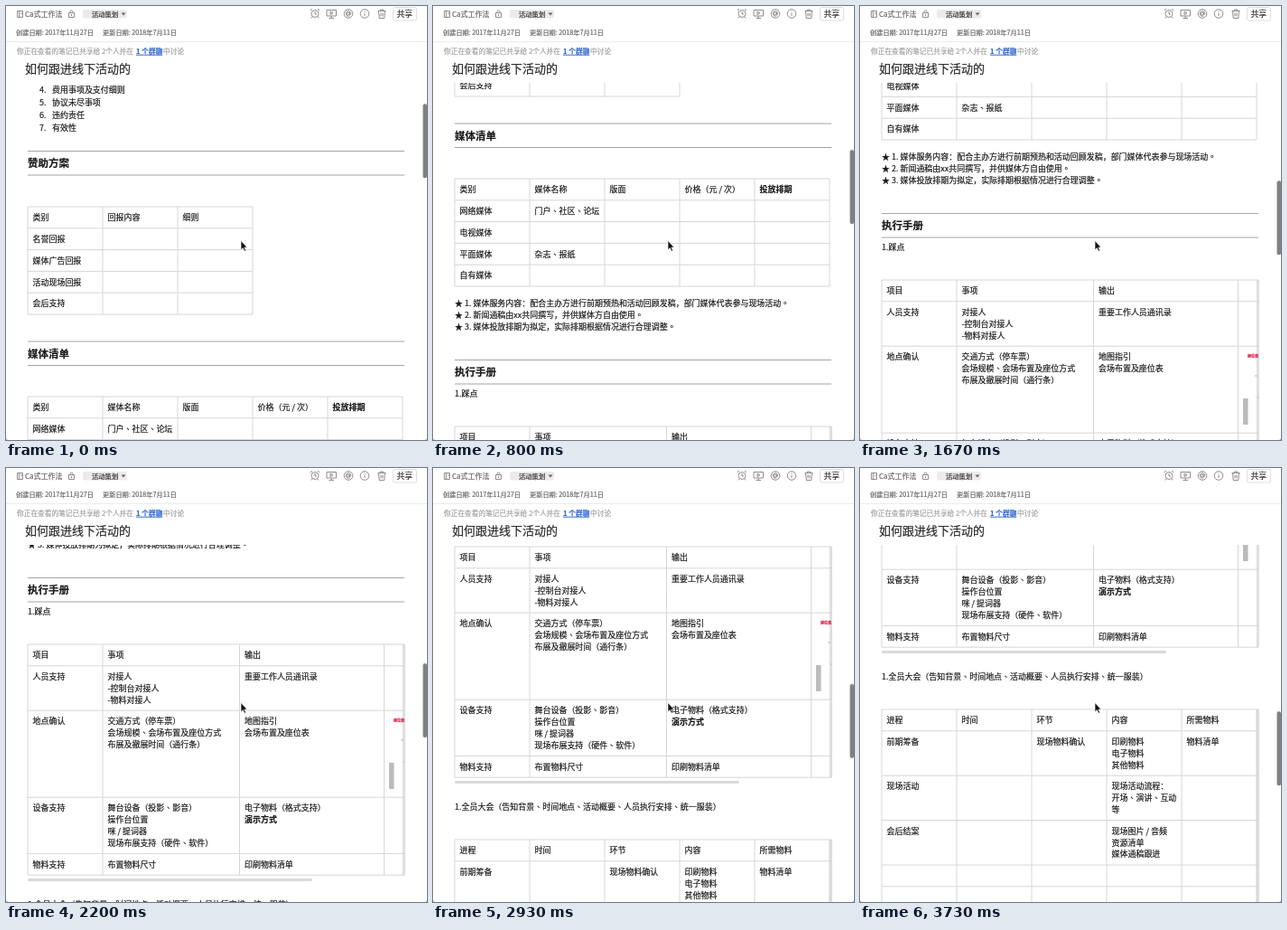
An HTML page for the animation above (3.99 s loop, 466 px wide and 480 px high).

```html
<!DOCTYPE html>
<html lang="zh-CN">
<head>
<meta charset="utf-8">
<title>活动策划</title>
<style>
html, body { margin: 0; width: 100%; height: 100%; overflow: hidden; background: #fff; }
svg { display: block; font-family: "Noto Sans CJK SC", "Noto Sans CJK", sans-serif; white-space: pre; }
.mid { font-family: "Noto Sans CJK TC", "Noto Sans CJK SC", sans-serif; }
.icons { fill: none; stroke: #808080; stroke-width: .9; }
.grid { fill: none; stroke: #d6d6d6; }
.rule { fill: none; stroke: #a4a4a4; }
</style>
</head>
<body>
<svg width="466" height="480" viewBox="0 0 466 480">
  <defs>
    <clipPath id="view"><rect y="85" width="466" height="395"/></clipPath>
    <linearGradient id="edge">
      <stop offset="0" stop-color="#d4d4d4" stop-opacity="0"/>
      <stop offset="1" stop-color="#c8c8c8"/>
    </linearGradient>
  </defs>
  <g clip-path="url(#view)"><g id="page"></g></g>
  <g id="head">
    <path d="M0 39.5H466" stroke="#ececec"/>
    <g class="icons">
      <path d="M12.5 5.5h6v7h-6zM14.5 5.5v7M16 8h2"/>
      <path d="M69.5 7.5h6v5h-6zM71 7.5v-1a1.5 1.5 0 0 1 3 0v1M72.5 9v2"/>
      <circle cx="342" cy="8.5" r="4"/>
      <path d="M342 6v3h2M337 5l2-2M347 5l-2-2M339 12l-1 1.5M345 12l1 1.5"/>
      <path d="M355 4.5h10.5v6.5h-10.5zM360.2 11v2M357.5 13.5h5.5M359 6v3.5l3-1.7z"/>
      <circle cx="379" cy="8.5" r="4.8"/>
      <circle cx="378.8" cy="8.5" r="1.5"/>
      <path d="M380.3 7v2.2q1.2 1 1.5-.7a2.8 2.8 0 1 0-1.3 2.3"/>
      <circle cx="397" cy="8.5" r="4.8"/>
      <path d="M397 7.7v3.3M397 5.6v1"/>
      <path d="M411.5 5.5h9M414.5 5.5v-1.5h3v1.5M412.5 5.5l.7 8h5.6l.7-8M415 7.5v4M417 7.5v4"/>
    </g>
    <rect x="85" y="4" width="49" height="9.5" rx="2" fill="#ebebeb"/>
    <path d="M127.5 7.5h5l-2.5 3z" fill="#666"/>
    <rect x="428.5" y="1.5" width="26" height="14.5" rx="2" fill="#fff" stroke="#dedede"/>
  </g>
  <rect id="thumb" x="461.5" y="108.3" width="4.5" height="82" rx="2" fill="#808080"/>
  <path d="M260 259.5v10.2l2.3-2 1.6 3.6 1.7-.7-1.6-3.6h3z" fill="#111" stroke="#fff" stroke-width=".7"/>
  <path d="M0 477q0 3 3 3h-3zM466 477q0 3-3 3h3z" fill="#aaa"/>
</svg>
<script>
const NS = 'http://www.w3.org/2000/svg';
const page = document.getElementById('page');
const head = document.getElementById('head');
const INK = '#1c1c1c', BODY = 8.97;
const BOLD = { 'font-weight': 700 };

function add(parent, tag, attrs) {
  const el = document.createElementNS(NS, tag);
  for (const key in attrs) el.setAttribute(key, attrs[key]);
  return parent.appendChild(el);
}

// y is the vertical centre of the line; enumeration commas and stops sit mid-cell
function text(parent, x, y, str, size = BODY, fill = INK, more = {}) {
  const el = add(parent, 'text', {
    x, y: y + size * .37, 'font-size': size, fill, stroke: fill, 'stroke-width': .2, ...more
  });
  for (const part of str.split(/([、。])/)) {
    const mid = /^[、。]$/.test(part);
    add(el, 'tspan', mid ? { class: 'mid', lang: 'zh-TW' } : {}).textContent = part;
  }
}

function heading(y, str) {
  add(page, 'path', { class: 'rule', d: `M24 ${y - 13.5}H441M24 ${y + 13}H441` });
  text(page, 24, y, str, 11.5, INK, BOLD);
}

// Rows are "a|b|c"; cells break at "\n", a leading "*" makes a line bold.
// Each row is as tall as its longest cell, or as tall[row] if given.
function table(top, xs, right, rows, tall = {}) {
  let y = top, d = `M24 ${top}H${right}`;
  rows.forEach((row, r) => {
    const cells = row.split('|').map(cell => cell.split('\n'));
    cells.forEach((lines, c) => lines.forEach((line, i) =>
      text(page, xs[c] + 5.5, y + 11.9 + i * 12.8, line.replace('*', ''), BODY, INK, line[0] === '*' ? BOLD : {})));
    y += tall[r] || 11 + 12.8 * Math.max(...cells.map(lines => lines.length));
    d += `M24 ${y}H${right}`;
  });
  for (const x of xs) d += `M${x} ${top}V${y}`;
  add(page, 'path', { class: 'grid', d });
  if (right > 440) add(page, 'rect', { x: 437.5, y: top, width: 4, height: y - top, fill: 'url(#edge)' });
}

// fixed header
text(head, 21, 9, 'Ca式工作法', 8, '#666');
text(head, 95, 9, '活动策划', 7.3, '#333');
text(head, 432.5, 9, '共享', 8.8, '#333');
text(head, 11, 29.7, '创建日期: 2017年11月27日', 7.2, '#666');
text(head, 107, 29.7, '更新日期: 2018年7月11日', 7.2, '#666');
text(head, 12, 50, '你正在查看的笔记已共享给 2个人并在', 7.7, '#a0a0a0');
text(head, 144, 50, '1 个群聊', 7.7, '#3a6fd0', { ...BOLD, 'text-decoration': 'underline' });
text(head, 174, 50, '中讨论', 7.7, '#a0a0a0');
text(head, 21, 69, '如何跟进线下活动的', 13, '#2a2a2a');

// scrolling note
['费用事项及支付细则', '协议未尽事项', '违约责任', '有效性'].forEach((str, i) => {
  text(page, 37, 93 + i * 14, i + 4 + '.');
  text(page, 51, 93 + i * 14, str);
});

const cols = Array.from({ length: 6 }, (_, i) => 24 + 83 * i);

heading(174, '赞助方案');
table(222, cols.slice(0, 4), 273,
  ['类别|回报内容|细则', '名誉回报', '媒体广告回报', '活动现场回报', '会后支持']);

heading(384.5, '媒体清单');
table(432, cols, 439, [
  '类别|媒体名称|版面|价格（元 / 次）|*投放排期',
  '网络媒体|门户、社区、论坛', '电视媒体', '平面媒体|杂志、报纸', '自有媒体']);
[
  '★ 1. 媒体服务内容：配合主办方进行前期预热和活动回顾发稿，部门媒体代表参与现场活动。',
  '★ 2. 新闻通稿由xx共同撰写，并供媒体方自由使用。',
  '★ 3. 媒体投放排期为拟定，实际排期根据情况进行合理调整。'
].forEach((str, i) => text(page, 24, 570 + i * 13, str));

heading(646, '执行手册');
text(page, 24, 670, '1.踩点');
table(706, [24, 107, 258.5, 418.5], 441, [
  '项目|事项|输出',
  '人员支持|对接人\n-控制台对接人\n-物料对接人|重要工作人员通讯录',
  '地点确认|交通方式（停车票）\n会场规模、会场布置及座位方式\n布展及撤展时间（通行条）|地图指引\n会场布置及座位表',
  '设备支持|舞台设备（投影、影音）\n操作台位置\n咪 / 提词器\n现场布展支持（硬件、软件）|电子物料（格式支持）\n*演示方式',
  '物料支持|布置物料尺寸|印刷物料清单'], { 2: 96 });
text(page, 429, 791, '座位表', 4, '#e0244e', BOLD);
add(page, 'rect', { x: 424, y: 837, width: 5.5, height: 29, fill: '#bbb' });
add(page, 'path', { d: 'M437 812h3M439.5 836h2', stroke: '#bbb' });
add(page, 'rect', { x: 24, y: 965, width: 315, height: 3, rx: 1.5, fill: '#dadada' });

text(page, 24, 993.5, '1.全员大会（告知背景、时间地点、活动概要、人员执行安排、统一服装）');
table(1030, cols, 441, [
  '进程|时间|环节|内容|所需物料',
  '前期筹备||现场物料确认|印刷物料\n电子物料\n其他物料|物料清单',
  '现场活动|||现场活动流程：\n开场、演讲、互动\n等',
  '会后结案|||现场图片 / 音频\n资源清单\n媒体通稿跟进',
  '', '']);

// Scrolling runs at 15 ticks a second: each flick has a start tick and a distance
const LOOP = 3990, TICKS = 60;
const flicks = [[0, 212], [10, 83], [20, 128], [30, 135], [41, 101], [50, 124]];

function glide(n) {
  if (n <= 0) return 0;
  return n < 6 ? 1 - Math.exp(-.1 * n * n) : 1;
}

function offsetAt(tick) {
  return Math.round(flicks.reduce((sum, [start, dist]) => sum + dist * glide(tick - start + 1), -20));
}

function scroll(el, ratio) {
  const frames = Array.from({ length: TICKS + 1 }, (_, tick) => ({
    offset: Math.min(1, Math.round(tick * 100 / 15) * 10 / LOOP),
    transform: `translateY(${offsetAt(tick) * ratio}px)`,
    easing: 'steps(1, end)'
  }));
  el.animate(frames, { duration: LOOP, iterations: Infinity });
}

scroll(page, -1);
scroll(document.getElementById('thumb'), .211);
</script>
</body>
</html>
```
